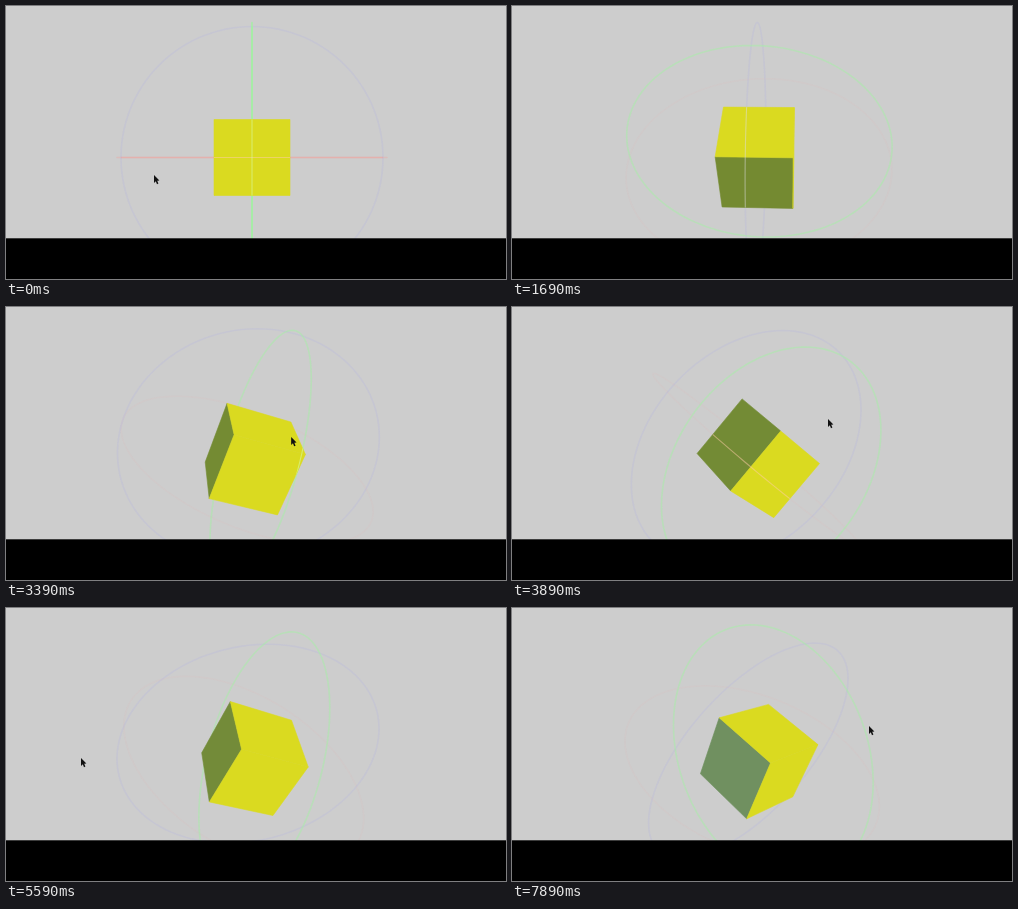
Recreate the animation shown at these times as an HTML page with a canvas. Size 500 by 273 pixels, loop 7.99 s.

```html
<!DOCTYPE html>
<html lang="en">
<head>
<meta charset="utf-8">
<title>Arcball cube</title>
<style>
  html, body { margin: 0; width: 100%; height: 100%; overflow: hidden; background: #000; }
  canvas { display: block; width: 500px; height: 273px; }
</style>
</head>
<body>
<canvas id="stage" width="500" height="273"></canvas>
<script>
const ctx = document.getElementById('stage').getContext('2d');
const LOOP = 7990, FLOOR = 232.3;
const CX = 246, CY = 151.5, DEPTH = 541, RADIUS = 131, HALF = 35.5;
const GLOSS = [-.66, -.23, .71];

// Poses the drags lead to: turns about x, y, z in degrees.
const poses = [
  { t: 0, turn: [0, 0, 0] },
  { t: 1690, turn: [84, 45, 85] },
  { t: 2690, turn: [37.6, -29.4, -1.3] },
  { t: 3890, turn: [5.2, 44.7, -36.2] },
  { t: 4790, turn: [13.5, 64.5, -84.1] },
  { t: 6690, turn: [-2.4, -16.2, 55.9] },
  { t: 7890, turn: [52.8, 44.3, 20.4] }
];

// Where the pointer comes to rest; it dips below the floor once.
const stops = [
  { t: 0, x: 148, y: 169 },
  { t: 1690, x: 112, y: 240 },
  { t: 2690, x: 234, y: 160 },
  { t: 3890, x: 316, y: 112 },
  { t: 4790, x: 424, y: 195 },
  { t: 5590, x: 75, y: 150 },
  { t: 6690, x: 70, y: 121 },
  { t: 7890, x: 357, y: 118 }
];

const rings = [
  { axis: 1, rgb: '255,140,130', front: '255,205,170', alpha: .05, flat: .25 },
  { axis: 2, rgb: '135,135,255', front: '222,222,225', alpha: .1, flat: .2 },
  { axis: 0, rgb: '165,240,165', front: '215,255,180', alpha: .5, flat: .9 }
];

const mix = (a, b, u) => a + (b - a) * u;
const dot = (a, b) => a.reduce((sum, c, i) => sum + c * b[i], 0);
const smooth = u => u * u * (3 - 2 * u);

function cross(a, b) {
  return [a[1] * b[2] - a[2] * b[1], a[2] * b[0] - a[0] * b[2], a[0] * b[1] - a[1] * b[0]];
}

function unit(v) {
  const n = Math.hypot(...v);
  return v.map(c => c / n);
}

function toQuat(turn) {
  const half = turn.map(d => d * Math.PI / 360);
  const [cx, cy, cz] = half.map(Math.cos), [sx, sy, sz] = half.map(Math.sin);
  return [
    cx * cy * cz + sx * sy * sz,
    sx * cy * cz - cx * sy * sz,
    cx * sy * cz + sx * cy * sz,
    cx * cy * sz - sx * sy * cz
  ];
}

function slerp(a, b, u) {
  const sign = dot(a, b) < 0 ? -1 : 1;
  const angle = Math.acos(Math.min(1, sign * dot(a, b)));
  if (angle < 1e-4) return a;
  const p = Math.sin((1 - u) * angle), r = sign * Math.sin(u * angle);
  return unit(a.map((c, i) => p * c + r * b[i]));
}

// The cube's own axes in view space: x right, y up, z to the viewer.
function axesOf([w, x, y, z]) {
  return [
    [1 - 2 * (y * y + z * z), 2 * (x * y + w * z), 2 * (x * z - w * y)],
    [2 * (x * y - w * z), 1 - 2 * (x * x + z * z), 2 * (y * z + w * x)],
    [2 * (x * z + w * y), 2 * (y * z - w * x), 1 - 2 * (x * x + y * y)]
  ];
}

// Finds the keys around t and how far t lies between them.
function between(keys, t) {
  const next = keys.findIndex(k => k.t > t);
  const i = next < 0 ? keys.length - 1 : next;
  const a = keys[i - 1], b = keys[i];
  return [a, b, Math.min(1, (t - a.t) / (b.t - a.t))];
}

// The picture advances about ten times a second, with three longer holds.
function stepTime(t) {
  const s = t < 890 ? Math.min(800, Math.floor(t / 100) * 100)
                    : Math.floor((t - 90) / 100) * 100 + 90;
  return [4890, 5690, 7490].includes(s) ? s - 100 : s;
}

function project([x, y, z]) {
  const k = DEPTH / (DEPTH - z);
  return [CX + x * k, CY - y * k];
}

function path(points, close) {
  ctx.beginPath();
  for (const [x, y] of points) ctx.lineTo(x, y);
  if (close) ctx.closePath();
}

// Strokes the near (1) or far (-1) half of a ring.
function drawRing(axes, ring, way, onCube) {
  const n = axes[ring.axis];
  const side = Math.hypot(n[0], n[1]) < 1e-6 ? [1, 0, 0] : unit([-n[1], n[0], 0]);
  let toward = cross(n, side);
  if (toward[2] < 0) toward = toward.map(c => -c);
  const points = [];
  for (let i = 0; i <= 60; i++) {
    const a = way * Math.PI * i / 60;
    points.push(project(side.map((c, j) => RADIUS * (c * Math.cos(a) + toward[j] * Math.sin(a)))));
  }
  const edgeOn = Math.max(0, 1 - Math.abs(n[2]) / .03);
  const alpha = onCube ? .5 : mix(ring.alpha, ring.flat, edgeOn);
  path(points);
  ctx.strokeStyle = `rgba(${onCube ? ring.front : ring.rgb},${alpha})`;
  ctx.lineWidth = onCube ? 1.1 : 1.6;
  ctx.stroke();
}

// Faces on the positive axes are fully lit; the others are dull with a cool gloss.
function faceColor(normal, lit) {
  if (lit) return '#dada20';
  const gloss = Math.max(0, dot(normal, GLOSS)) ** 8;
  return `rgb(${mix(116, 112, gloss)},${mix(138, 144, gloss)},${mix(46, 98, gloss)})`;
}

function cubeFaces(axes) {
  const faces = [];
  for (let k = 0; k < 3; k++) {
    const a = axes[(k + 1) % 3], b = axes[(k + 2) % 3];
    for (const s of [1, -1]) {
      const normal = axes[k].map(c => c * s);
      if (normal[2] * DEPTH <= HALF) continue;
      const points = [0, 1, 2, 3].map(i => {
        const p = i === 1 || i === 2 ? 1 : -1, q = i > 1 ? 1 : -1;
        return project(normal.map((c, j) => HALF * (c + p * a[j] + q * b[j])));
      });
      faces.push({ points, color: faceColor(normal, s > 0) });
    }
  }
  return faces;
}

function drawPointer(x, y) {
  const shape = [[0, 0], [0, 8], [1.8, 6.3], [3, 9.2], [4.4, 8.6], [3.2, 5.8], [5.4, 5.5]];
  path(shape.map(p => [x + p[0], y + p[1]]), true);
  ctx.fillStyle = '#111';
  ctx.fill();
}

function draw(t) {
  const [a, b, u] = between(poses, t);
  const axes = axesOf(slerp(toQuat(a.turn), toQuat(b.turn), u));
  const faces = cubeFaces(axes);

  ctx.fillStyle = '#cdcdcd';
  ctx.fillRect(0, 0, 500, 273);
  ctx.lineJoin = 'round';
  for (const ring of rings) {
    for (const way of [-1, 1]) drawRing(axes, ring, way, false);
  }
  for (const { points, color } of faces) {
    path(points, true);
    ctx.fillStyle = ctx.strokeStyle = color;
    ctx.lineWidth = .6;
    ctx.fill();
    ctx.stroke();
  }
  for (const { points } of faces) {
    ctx.save();
    path(points, true);
    ctx.clip();
    for (const ring of rings) drawRing(axes, ring, 1, true);
    ctx.restore();
  }

  const [p, q, v] = between(stops, t);
  drawPointer(mix(p.x, q.x, smooth(v)), mix(p.y, q.y, smooth(v)));
  ctx.fillStyle = '#000';
  ctx.fillRect(0, FLOOR, 500, 273 - FLOOR);
}

const start = performance.now();
function tick() {
  draw(stepTime((performance.now() - start) % LOOP));
  requestAnimationFrame(tick);
}
tick();
</script>
</body>
</html>
```
